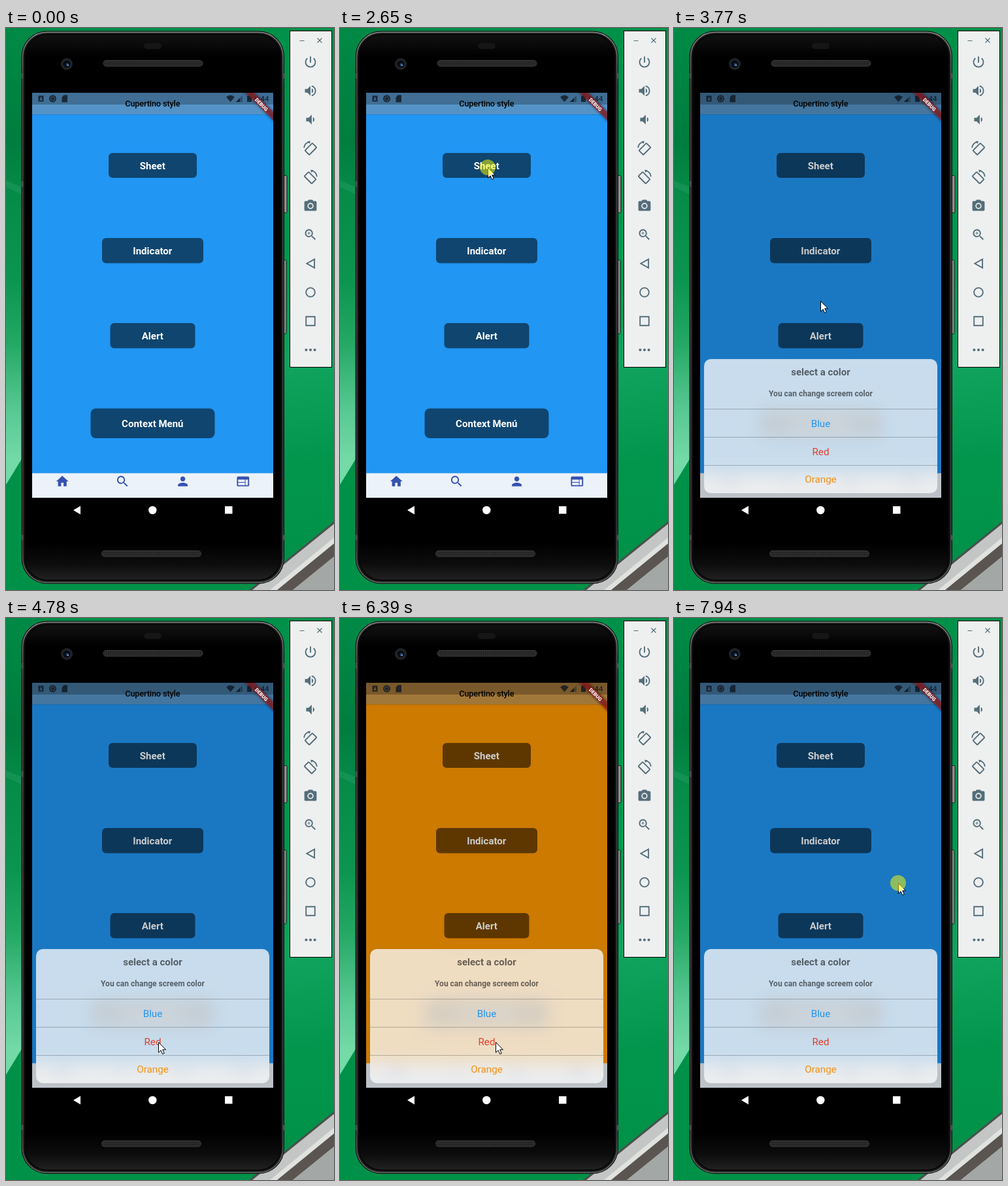
Animation of 502 by 859 pixels, one loop 8000 ms. Source, as an HTML page:

```html
<!DOCTYPE html>
<html lang="en">
<head>
<meta charset="utf-8">
<title>Phone demo</title>
<style>
html, body { margin: 0; width: 100%; height: 100%; overflow: hidden; background: #008a46; }
svg { display: block; width: 100%; height: 100%; font-family: Roboto, sans-serif; }
.mid { text-anchor: middle; }
.btn text { fill: #fff; font-weight: 600; font-size: 15px; }
.line { fill: none; stroke: #546e7a; stroke-width: 2; }
</style>
</head>
<body>
<svg viewBox="0 0 502 859" preserveAspectRatio="none">
  <defs>
    <linearGradient id="leftBg" x1="0" y1="0" x2="0" y2="1">
      <stop offset="0" stop-color="#008a46"/><stop offset=".2" stop-color="#007d3e"/>
      <stop offset=".29" stop-color="#068a48"/><stop offset=".45" stop-color="#0c9550"/>
      <stop offset=".56" stop-color="#24a864"/><stop offset=".68" stop-color="#58c893"/>
      <stop offset=".77" stop-color="#74daa8"/><stop offset="1" stop-color="#74daa8"/>
    </linearGradient>
    <linearGradient id="rightBg" x1="0" y1="0" x2=".06" y2="1">
      <stop offset="0" stop-color="#008f48"/><stop offset=".5" stop-color="#009a50"/>
      <stop offset=".64" stop-color="#10a45e"/><stop offset=".82" stop-color="#02964d"/>
      <stop offset="1" stop-color="#009148"/>
    </linearGradient>
    <linearGradient id="glass" x1="0" y1="0" x2="0" y2="1">
      <stop offset="0" stop-color="#121212"/><stop offset=".04" stop-color="#000"/>
      <stop offset=".93" stop-color="#000"/><stop offset=".97" stop-color="#0c0c0c"/>
      <stop offset="1" stop-color="#222"/>
    </linearGradient>
    <linearGradient id="rim" x1="0" y1="0" x2="0" y2="1">
      <stop offset="0" stop-color="#8a8c8b"/><stop offset=".1" stop-color="#4a4a4a"/>
      <stop offset=".9" stop-color="#3c3c3c"/><stop offset="1" stop-color="#6a6c6b"/>
    </linearGradient>
    <pattern id="mesh" width="3" height="3" patternUnits="userSpaceOnUse">
      <rect width="3" height="3" fill="#2e2e2e"/><rect width="1.5" height="1.5" fill="#171717"/>
    </pattern>
    <clipPath id="screenClip"><rect x="40" y="99" width="369" height="619"/></clipPath>
    <clipPath id="sheetClip"><rect id="sheetBox" x="46" y="506" width="357" height="205" rx="10.5"/></clipPath>
    <filter id="blur" filterUnits="userSpaceOnUse" x="0" y="440" width="460" height="320" color-interpolation-filters="sRGB">
      <feGaussianBlur stdDeviation="12.5"/>
    </filter>
    <filter id="soft" x="-30%" y="-150%" width="160%" height="400%"><feGaussianBlur stdDeviation="2.2"/></filter>
  </defs>

  <!-- desktop -->
  <rect width="502" height="859" fill="url(#rightBg)"/>
  <rect width="60" height="859" fill="url(#leftBg)"/>
  <path d="M0 698L60 600V859H0z" fill="#009149"/>
  <path d="M0 233L40 250V262L0 243z" fill="#28a166" opacity=".4"/>
  <path d="M502 754L372 859H502z" fill="#4a504c"/>
  <path d="M502 758L377 859H502z" fill="#c3c6c4"/>
  <path d="M502 779L404 859h11L502 788z" fill="#e0e2e0"/>
  <path d="M502 788L415 859h24L502 808z" fill="#5a5550"/>
  <path d="M502 808L439 859H502z" fill="#a3a7a5"/>

  <!-- phone body -->
  <g fill="#8b908e" stroke="#1d1f1e">
    <rect x="423" y="225.5" width="7" height="57" rx="2"/>
    <rect x="423" y="354.5" width="6" height="113" rx="2"/>
  </g>
  <rect x="23.5" y="4.500" width="402.500" height="845" rx="39" fill="#101010"/>
  <rect x="25.500" y="6.500" width="398.500" height="841" rx="37" fill="#1c1c1c" stroke="url(#rim)" stroke-width="1.500"/>
  <rect x="29" y="10" width="391.500" height="834" rx="34" fill="url(#glass)" stroke="#070707" stroke-width="2"/>
  <path d="M25 69v8M25 234v9M425 69v8M425 775v8M25 775v8" stroke="#4c4e4d" stroke-width="3"/>
  <rect x="211" y="23" width="27" height="9" rx="4.5" fill="#161616"/>
  <circle cx="93" cy="55" r="9" fill="#212326"/>
  <circle cx="93" cy="55" r="5.5" fill="#080d15"/>
  <circle cx="94" cy="56" r="2.2" fill="#234d80"/>
  <circle cx="95" cy="57" r=".9" fill="#9fc5e8"/>
  <g fill="url(#mesh)" stroke="#3b3b3b">
    <rect x="149" y="49.5" width="152" height="9" rx="4.5"/>
    <rect x="146.5" y="799" width="152" height="9" rx="4.5"/>
  </g>
  <g fill="#fff">
    <path d="M103 737l11-6.5v13z"/>
    <circle cx="224.3" cy="737" r="6.2"/>
    <rect x="335" y="731" width="11.5" height="11.5"/>
  </g>

  <!-- app -->
  <g clip-path="url(#screenClip)">
    <g id="app">
      <rect id="page" y="60" width="460" height="720"/>
      <rect x="40" y="99" width="369" height="33" fill="#8f8f94" fill-opacity=".48"/>
      <path d="M40 132.5h369" stroke="#000" stroke-opacity=".12"/>
      <text class="mid" x="224.3" y="120.3" font-size="12.75" font-weight="500" letter-spacing="-.15">Cupertino style</text>
      <g id="buttons" class="btn mid"></g>
      <rect y="680.5" width="460" height="100" fill="#ebf2f9"/>
      <g id="tabs" fill="#3651b0"></g>
      <rect id="dim" y="60" width="460" height="720"/>
    </g>
    <g id="sheetBack" clip-path="url(#sheetClip)">
      <use href="#app" filter="url(#blur)"/>
      <rect x="40" y="480" width="369" height="260" fill="#f9f9f9" fill-opacity=".78"/>
    </g>
    <g id="sheet" class="mid">
      <g fill="#000" fill-opacity=".57" font-weight="700">
        <text x="224.5" y="25" font-size="15">select a color</text>
        <text x="224.5" y="56.5" font-size="12">You can change screem color</text>
      </g>
      <path d="M46 76.5h357M46 119.5h357M46 162.5h357" stroke="#000" stroke-opacity=".24"/>
      <g font-size="15.2">
        <text x="224.5" y="103.5" fill="#2196f3">Blue</text>
        <text x="224.5" y="146.5" fill="#e53d2c">Red</text>
        <text x="224.5" y="189.3" fill="#f79010">Orange</text>
      </g>
    </g>

    <!-- status bar -->
    <rect x="40" y="99" width="369" height="18" fill-opacity=".25"/>
    <g fill="#0d1620" fill-opacity=".78">
      <path fill-rule="evenodd" d="M49.5 103.5h8v9h-8zM51.500 111h1l.4-1h1.300l.4 1h1l-1.500-5.500h-1z"/>
      <circle cx="71.5" cy="108" r="5.5"/>
      <path d="M85.5 106l3-3.5h5.5v11h-8.5z"/>
      <path d="M337 105.5q6.5-5.5 13 0l-6.5 7.5z"/>
      <path d="M352 113l10-10v10z" fill-opacity=".35"/><path d="M352 113l6-6v6z"/>
      <path d="M369 104h2v-1.5h3v1.5h2v9h-7z"/>
      <text x="380" y="112" font-size="11.5" font-weight="500">9:44</text>
    </g>
    <circle cx="71.5" cy="108" r="3.2" fill="none" stroke="#fff" stroke-opacity=".18"/>
    <g transform="translate(409 99) rotate(45)">
      <rect x="-34" y="20.5" width="68" height="9.5" opacity=".5" filter="url(#soft)"/>
      <rect x="-34" y="20.5" width="68" height="9.5" fill="#a81c1e" fill-opacity=".6"/>
      <text class="mid" y="28.2" font-size="7.65" font-weight="900" fill="#fff">DEBUG</text>
    </g>
  </g>

  <!-- emulator toolbar -->
  <rect x="434.5" y="4.5" width="64" height="514" fill="#eef0f0" stroke="#000"/>
  <path d="M449.5 19.5h7M476.5 15.5l7 7m0-7l-7 7" class="line" style="stroke-width:1.2"/>
  <g id="tools" fill="#546e7a"></g>

  <g id="cursor">
    <path d="M.5.5v15.7l3.6-3.4 2.6 5.7 2.6-1.2-2.6-5.5h4.8z" fill="#fff" stroke="#000"/>
    <circle id="click" r="12" fill="#ff0" fill-opacity=".5"/>
  </g>
</svg>

<script>
const LOOP = 8000;
const $ = id => document.getElementById(id);

const lens = 'M15.5 14h-.79l-.28-.27C15.41 12.59 16 11.11 16 9.5 16 5.91 13.09 3 9.5 3S3 5.91 3 9.5 5.91 16 9.5 16c1.61 0 3.09-.59 4.23-1.57l.27.28v.79l5 4.99L20.49 19l-4.99-5zm-6 0C7.01 14 5 11.99 5 9.5S7.01 5 9.5 5 14 7.01 14 9.5 11.99 14 9.5 14z';
const rotate = `<g class="line" stroke-linejoin="round">
  <rect x="-8.5" y="-5" width="17" height="10" rx="1" transform="translate(11.5 13) rotate(45)"/>
  <path d="M13 1.5Q21.5 2.5 22.5 11"/></g><path d="M12 0l5 .5-3.5 4z"/>`;
const path = d => `<path d="${d}"/>`;
const line = d => `<path class="line" d="${d}"/>`;

const icons = {
  home: path('M10 20v-6h4v6h5v-8h3L12 3 2 12h3v8z'),
  search: path(lens),
  person: path('M12 12c2.21 0 4-1.79 4-4s-1.79-4-4-4-4 1.79-4 4 1.79 4 4 4zm0 2c-2.67 0-8 1.34-8 4v2h16v-2c0-2.66-5.33-4-8-4z'),
  web: path('M20 4H4c-1.1 0-2 .9-2 2v12c0 1.1.9 2 2 2h16c1.1 0 2-.9 2-2V6c0-1.1-.9-2-2-2zm-5 14H4v-4h11v4zm0-5H4V9h11v4zm5 5h-4V9h4v9z'),
  power: line('M12 3v10M7 5.9a8 8 0 1 0 10 0'),
  louder: path('M3 9v6h4l5 5V4L7 9zM14 8q2.5 1.3 2.5 4T14 16z') + line('M14 4.3a7.9 7.9 0 0 1 0 15.4'),
  quieter: path('M5 9v6h4l5 5V4L9 9zM16 8q2.5 1.3 2.5 4T16 16z'),
  left: `<g transform="matrix(-1 0 0 1 24 0)">${rotate}</g>`,
  right: rotate,
  camera: path('M9 2L7.17 4H4c-1.1 0-2 .9-2 2v12c0 1.1.9 2 2 2h16c1.1 0 2-.9 2-2V6c0-1.1-.9-2-2-2h-3.17L15 2zm3 15a5 5 0 1 1 0-10 5 5 0 0 1 0 10z') + '<circle cx="12" cy="12" r="3.2"/>',
  zoom: path(lens) + path('M12 10h-2v2H9v-2H7V9h2V7h1v2h2z'),
  back: line('M18.5 5v14L6 12z'),
  circle: '<circle class="line" cx="12" cy="12" r="7.3"/>',
  square: line('M4.8 4.8h14.4v14.4H4.8z'),
  more: [5, 12, 19].map(x => `<circle cx="${x}" cy="12" r="2.2"/>`).join('')
};
const icon = (name, x, y) =>
  `<g transform="translate(${x} ${y}) scale(.94) translate(-12 -12)">${icons[name]}</g>`;

$('tabs').innerHTML = ['home', 'search', 'person', 'web']
  .map((n, i) => icon(n, 86.2 + 92.2 * i, 693)).join('');
$('tools').innerHTML = ['power', 'louder', 'quieter', 'left', 'right', 'camera', 'zoom', 'back', 'circle', 'square', 'more']
  .map((n, i) => icon(n, 466, 52 + 44 * i)).join('');

const button = (label, y, w, h, r) =>
  `<g><rect x="${224.5 - w / 2}" y="${y}" width="${w}" height="${h}" rx="${r}" fill-opacity=".54"/>
   <text x="224.3" y="${y + h / 2 + 5.5}">${label}</text></g>`;
$('buttons').innerHTML = button('Sheet', 191, 135, 38, 6) + button('Indicator', 321, 155, 38.5, 6)
  + button('Alert', 451, 130, 38.5, 6) + button('Context Menú', 581.5, 190, 45.5, 8);
const sheetButton = $('buttons').firstElementChild;

// time, x, y
const track = [
  [450, 433, 842], [790, 270, 740], [1120, 80, 690], [1520, 80, 690], [1700, 140, 678],
  [1850, 182, 670], [2050, 238, 300], [2180, 262, 235], [2320, 237, 213], [2380, 226, 213],
  [3500, 226, 213], [3970, 222, 567], [4310, 230, 661], [4510, 233, 648], [5120, 233, 648],
  [5400, 235, 686], [5780, 235, 686], [5850, 237, 679], [5980, 237, 679], [6190, 238, 648],
  [6680, 238, 648], [7100, 255, 601], [7520, 255, 601], [7900, 343, 405], [LOOP, 343, 405]
];
const clicks = [[2650, 2780], [4570, 4710], [5560, 5690], [6250, 6390], [7190, 7320], [7930, LOOP]];
const colors = [[0, '#2196f3'], [4850, '#f44336'], [5780, '#ff9800'], [6540, '#f44336'], [7400, '#2196f3']];
const OPEN = 3232, OPEN_MS = 335;

const clamp = v => Math.min(1, Math.max(0, v));

// cubic-bezier(.35, .91, .33, .97)
function easeOut(x) {
  const curve = (s, a, b) => 3 * (1 - s) * (1 - s) * s * a + 3 * (1 - s) * s * s * b + s ** 3;
  let lo = 0, hi = 1;
  for (let i = 0; i < 20; i++) {
    const s = (lo + hi) / 2;
    if (curve(s, .35, .33) < x) lo = s; else hi = s;
  }
  return curve(hi, .91, .97);
}

function cursorAt(t) {
  const i = Math.max(1, track.findIndex(k => k[0] > t));
  const [a, b] = [track[i - 1], track[i]];
  const p = clamp((t - a[0]) / (b[0] - a[0]));
  return [1, 2].map(n => Math.round(a[n] + (b[n] - a[n]) * p));
}

let last = '';
function draw(t) {
  $('cursor').setAttribute('transform', `translate(${cursorAt(t)})`);
  $('cursor').style.display = t < 450 ? 'none' : '';
  $('click').style.display = clicks.some(([a, b]) => t >= a && t < b) ? '' : 'none';

  const color = colors.filter(c => c[0] <= t).pop()[1];
  const shade = .2 * easeOut(clamp((t - OPEN + 67) / OPEN_MS));
  const top = Math.round(506 + 212 * (1 - easeOut(clamp((t - OPEN) / OPEN_MS))));
  // the pressed button fades back in
  const press = t < 3170 ? 1 : .4 + .6 * clamp((t - 3170) / 180);
  const state = [color, shade, top, press].join();
  if (state === last) return;
  last = state;
  $('page').setAttribute('fill', color);
  $('dim').setAttribute('fill-opacity', shade);
  sheetButton.setAttribute('opacity', press);
  $('sheetBox').setAttribute('y', top);
  $('sheet').setAttribute('transform', `translate(0 ${top})`);
  $('sheet').style.display = $('sheetBack').style.display = t < OPEN ? 'none' : '';
}

const start = performance.now();
function tick() {
  draw((performance.now() - start) % LOOP);
  requestAnimationFrame(tick);
}
tick();
</script>
</body>
</html>
```
